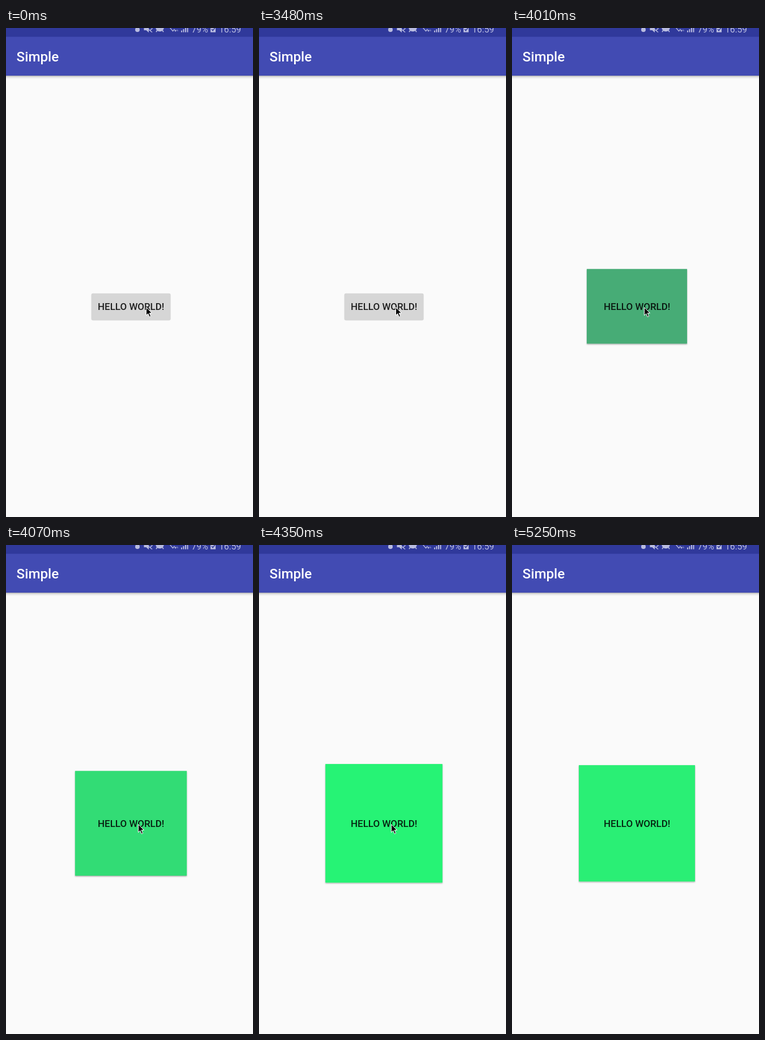
An HTML page for the animation above (6.67 s loop, 436x862 px).

```html
<!DOCTYPE html>
<html lang="en">
<head>
<meta charset="utf-8">
<title>Simple</title>
<style>
  html, body { margin: 0; width: 100%; height: 100%; overflow: hidden; background: #fafafa; }
  svg { display: block; width: 100vw; height: 100vh; font-family: Roboto, sans-serif; }
</style>
</head>
<body>
<svg viewBox="0 0 436 862">
  <defs>
    <linearGradient id="fade" x2="0" y2="1">
      <stop offset="0" stop-color="#000" stop-opacity=".3"/>
      <stop offset=".4" stop-color="#000" stop-opacity=".1"/>
      <stop offset="1" stop-color="#000" stop-opacity="0"/>
    </linearGradient>
    <filter id="lift" x="-10%" y="-10%" width="120%" height="130%">
      <feDropShadow dx="0" dy="1.2" stdDeviation="1.1" flood-color="#000" flood-opacity=".38"/>
    </filter>
  </defs>

  <rect width="436" height="862" fill="#fafafa"/>
  <rect y="84" width="436" height="6" fill="url(#fade)"/>
  <rect width="436" height="84" fill="#424bb3"/>
  <rect width="436" height="15.5" fill="#30399b"/>
  <text x="18.6" y="59.3" font-size="24.2" font-weight="500" fill="#fff">Simple</text>

  <g id="status" fill="#b9bce0" stroke="none">
    <circle cx="232" cy="3" r="4"/>
    <path d="M243.5 -1h4l4.500 -4v13l-4.500 -4h-4z"/>
    <path d="M246 -2l12 9.500M254 4.500l4.500 -4" fill="none" stroke="#b9bce0" stroke-width="1.500"/>
    <path d="M265 -1a6.500 6.500 0 0 0 13 0zM267 4l-2 3M276 4l2 3" stroke="#b9bce0" stroke-width="1.600"/>
    <path d="M289 -1l5.500 6.500 3 -3.500" fill="none" stroke="#b9bce0" stroke-width="1.300"/>
    <path d="M297 3.500h4l-2 3.500z"/>
    <path id="arrow" d="M300.500 5.500h4l-2 -3.500z"/>
    <path d="M309 4.500h2v3h-2zM312.500 2h2v5.500h-2zM316 -1h2v8.500h-2zM319.500 -4h2v11.500h-2z"/>
    <text x="327.500" y="7.500" font-size="15.700">79%</text>
    <rect x="361" y="-4" width="9" height="11.500"/>
    <path d="M363 2l2 2.500 4 -5" fill="none" stroke="#30399b" stroke-width="1.500"/>
    <text x="376" y="7.500" font-size="15.700">16:59</text>
  </g>

  <rect id="box"/>
  <text x="220.7" y="497" font-size="16.95" font-weight="500" text-anchor="middle" fill="#000" fill-opacity=".86">HELLO WORLD!</text>
  <path id="cursor" d="M.5 .5V14.600L3.800 11.500 6.200 17.200 8.600 16.200 6.200 10.600H10.600Z" fill="#000" stroke="#fff" stroke-width="1" stroke-linejoin="round"/>
</svg>

<script>
const LOOP = 6670;
const PRESS = 3950;
const CX = 220.5, CY = 490.6;
const START = { w: 149, h: 58, rgb: [101, 104, 120] };
const END = { w: 205, h: 205, rgb: [42, 239, 117] };

// The screen refreshes at these moments while the box grows.
const TICKS = [3950, 4010, 4070, 4120, 4180, 4290, 4350, 4410];

// Pointer stops: time, x, y
const STOPS = [
  [0, 247, 492], [3480, 241, 492], [3530, 233, 492],
  [4680, 239, 508], [4740, 254, 550], [4790, 274, 610], [4850, 300, 671],
  [5020, 318, 691], [5080, 342, 717], [5140, 374, 755], [5190, 409, 813],
  [5250, 450, 880]
];

const $ = id => document.getElementById(id);
const box = $('box'), cursor = $('cursor'), arrow = $('arrow');
const mix = (a, b, k) => a + (b - a) * k;
const set = (el, attrs) => {
  for (const key in attrs) el.setAttribute(key, attrs[key]);
};

function overshoot(p) {
  const u = Math.min(Math.max(p, 0), 1) - 1;
  return u * u * (3 * u + 2) + 1;
}

function drawBox(t) {
  if (t < PRESS) {
    set(box, { x: 150.5, y: 467.8, width: 140.2, height: 47.6, rx: 3.2, fill: '#d6d6d6', filter: 'none' });
    return;
  }
  const tick = TICKS.filter(s => s <= t).pop();
  const k = overshoot((tick - 3956) / 454);
  const w = mix(START.w, END.w, k), h = mix(START.h, END.h, k);
  const rgb = START.rgb.map((c, i) => Math.round(mix(c, END.rgb[i], k)));
  set(box, {
    x: CX - w / 2, y: CY - h / 2, width: w, height: h, rx: 0,
    fill: `rgb(${rgb})`, filter: 'url(#lift)'
  });
}

function draw(t) {
  drawBox(t);
  const [, x, y] = STOPS.filter(s => s[0] <= t).pop();
  set(cursor, { transform: `translate(${x} ${y})` });
  set(arrow, { opacity: t >= 510 && t < 1470 ? 1 : 0.45 });
}

const begin = performance.now();
function frame() {
  draw((performance.now() - begin) % LOOP);
  requestAnimationFrame(frame);
}
frame();
</script>
</body>
</html>
```
